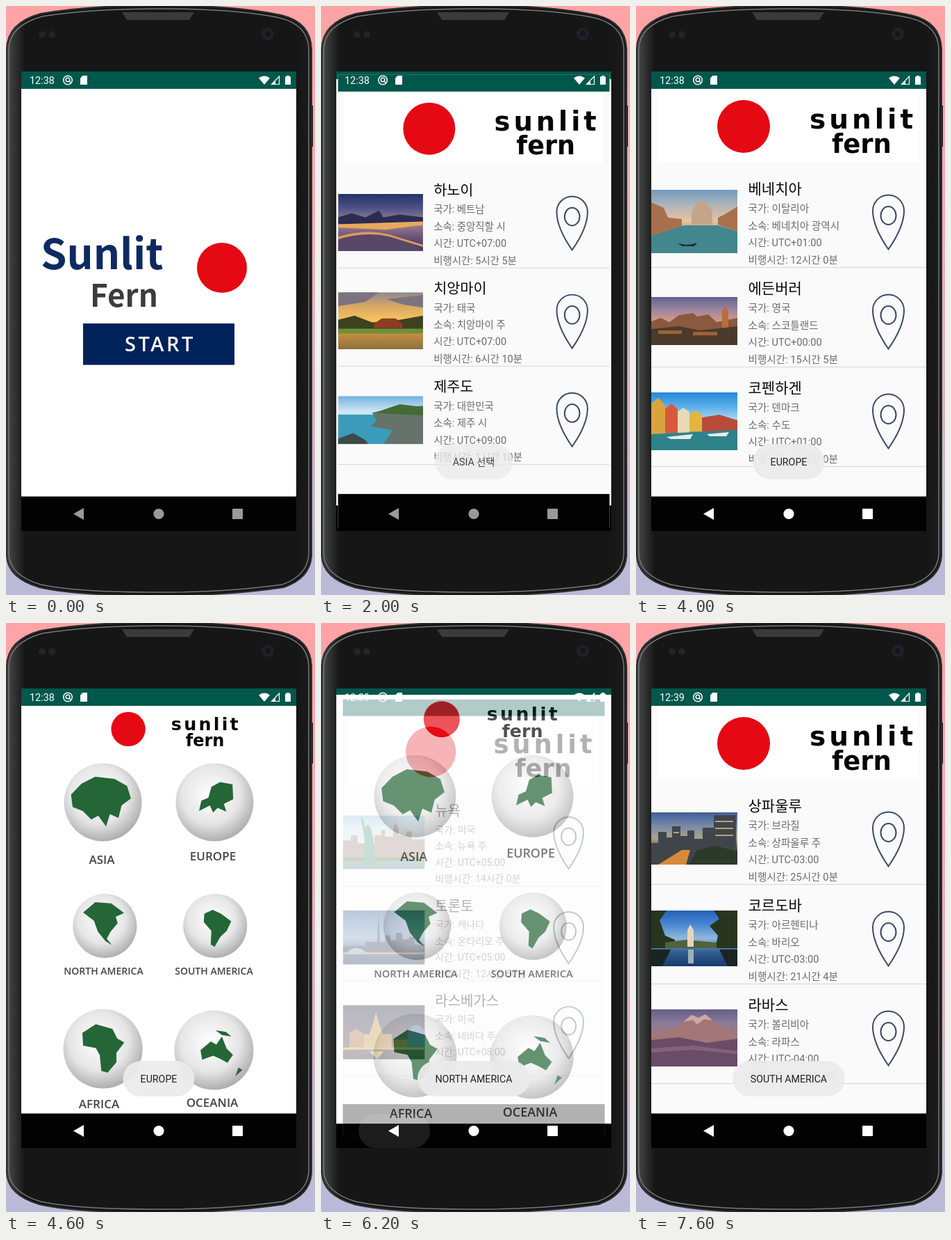
Animation of 445x846 px, one loop 8000 ms. Source, as an HTML page:

```html
<!DOCTYPE html>
<html lang="ko">
<head>
<meta charset="utf-8">
<title>City guide demo</title>
<style>
  html, body { margin: 0; width: 100%; height: 100%; overflow: hidden; }
  svg { display: block; width: 100%; height: 100%; }
  text { font-family: Roboto, "Noto Sans CJK KR", "Noto Sans CJK", sans-serif; white-space: pre; }
  .mid { text-anchor: middle; }
  .brand { font-family: "Noto Sans CJK KR", "Noto Sans CJK", "Noto Sans", sans-serif; font-weight: 700; }
  .round { font-family: "DejaVu Sans", sans-serif; font-weight: 700; }
  .hand { font-family: "Open Sans", sans-serif; font-weight: 600; }
</style>
</head>
<body>
<svg id="stage" viewBox="0 0 445 846"></svg>
<script>
const LOOP = 8000, STEP = 100;
const RED = '#e50914', TEAL = '#00574b';

const rect = (x, y, w, h, fill, extra = '') =>
  `<rect x="${x}" y="${y}" width="${w}" height="${h}" fill="${fill}" ${extra}/>`;
const circle = (x, y, r, fill, extra = '') =>
  `<circle cx="${x}" cy="${y}" r="${r}" fill="${fill}" ${extra}/>`;
const path = (d, fill, extra = '') => `<path d="${d}" fill="${fill}" ${extra}/>`;
const text = (x, y, size, fill, str, extra = '') =>
  `<text x="${x}" y="${y}" font-size="${size}" fill="${fill}" ${extra}>${str}</text>`;
const gradient = (id, colors, across = false) =>
  `<linearGradient id="${id}" x2="${across ? 1 : 0}" y2="${across ? 0 : 1}">` +
  colors.map((c, i) => `<stop offset="${i / (colors.length - 1)}" stop-color="${c}"/>`).join('') +
  '</linearGradient>';

// A full app window with its status and navigation backgrounds.
const appWindow = (id, background, content) =>
  `<g id="${id}">${rect(22, 94, 396, 660, background)}${content}
   ${rect(22, 94, 396, 25, TEAL)}${rect(22, 704.5, 396, 50, '#020202')}</g>`;

const startScreen = appWindow('start', '#fff',
  text(50, 378, 60, '#0e2a60', 'Sunlit', 'class="brand"') +
  text(121, 432, 44, '#3c3c3e', 'Fern', 'class="brand"') +
  circle(311, 376, 36, RED) +
  rect(111, 456, 218, 59.5, '#00225a') +
  text(222, 496, 29, '#fff', 'START', 'class="mid hand" letter-spacing="3.5"'));

const header = (scale, x, y) =>
  `<g transform="translate(${x} ${y}) scale(${scale})">
   ${circle(-170, -1, 38, RED)}
   ${text(2, 1.5, 39, '#050505', 'sunlit', 'class="mid round" letter-spacing="5"')}
   ${text(0, 36.5, 37, '#050505', 'fern', 'class="mid round"')}</g>`;

// Land outlines are relative to a globe of radius 100.
const globes = [
  ['ASIA', 139.6, 257.6, 56, 138, 346, 17, 'M-82-20-55-48-20-66 30-60 62-42 72-10 48 8 40 40 18 30 8 62-12 34-30 44-52 22-78 12Z'],
  ['EUROPE', 300.4, 257.6, 56, 298, 341, 17, 'M-8-40 14-52 46-46 48-8 24 4 30 24 8 14-4 26-12 8-40 22-34-4-16-12Z'],
  ['NORTH AMERICA', 142.4, 435, 46, 140.5, 505, 14, 'M-68-42-30-74 20-70 60-40 34-28 40-8 18 18 6 40 22 60 2 48-22 18-34-16Z'],
  ['SOUTH AMERICA', 301.3, 435, 46, 299.5, 505, 14, 'M-34-38-8-50 18-38 50-14 36 16 16 34-2 66-14 58-12 16-36-12Z'],
  ['AFRICA', 139.6, 611.6, 57, 134, 697, 17, 'M-52-40-18-62 24-50 36-26 54-16 34 10 34 34 12 60-4 56-8 16-18-2-50-8Z'],
  ['OCEANIA', 299.5, 613.5, 57, 297, 695, 17, 'M-34 0-8-22 6-14 20-34 32-4 48 12 34 32 16 22-2 14-30 24ZM4-50 30-46 44-34 20-38ZM62 44 72 50 54 66Z']
];
const menuScreen = appWindow('menu', '#fff', header(.65, 286.6, 153) +
  globes.map(([name, x, y, r, labelX, labelY, size, land]) =>
    circle(x, y, r, 'url(#globe)') +
    path(land, '#246636', `transform="translate(${x} ${y}) scale(${r / 100})"`) +
    text(labelX, labelY, size, '#444', name, 'class="mid hand"')).join(''));

// City: name, country, region, time zone, flight, photo top, photo height, backdrop, [colour, shape]...
const lists = {
  asia: [
    ['하노이', '베트남', '중앙직할 시', 'UTC+07:00', '5시간 5분', 268, 83, ['#243266', '#4d5288', '#a48590', '#6a5478', '#42385e'],
      ['#2b2c50', 'M0 34 20 28 40 34 60 24 66 34 90 30 124 34V44H0Z'], ['#e9a85c', 'M0 44 124 40V45L70 52 0 49Z'],
      ['#584766', 'M0 83V66Q40 54 70 60T124 83Z'], ['#d99a63', 'M0 62Q40 50 75 59L124 74V77L75 62Q40 54 0 66Z']],
    ['치앙마이', '태국', '치앙마이 주', 'UTC+07:00', '6시간 10분', 411, 83, ['#8d8890', '#d9a864', '#f6c65c', '#c08a40', '#8d7140'],
      ['#7b7480', 'M0 0H60L40 14 0 20ZM70 10 124 4V22L96 18Z'], ['#3c4220', 'M0 40 24 34 50 44 90 40 124 34V58H0Z'],
      ['#8c3c24', 'M52 46 64 38 84 38 94 46V52H52Z'], ['#6f9038', 'M0 53H124V60H0Z']],
    ['제주도', '대한민국', '제주 시', 'UTC+09:00', '1시간 10분', 562, 70, ['#6fb2e0', '#d5e8f2', '#3f9fbf', '#257e9f'],
      ['#3a9cba', 'M0 27H124V70H0Z'], ['#66736a', 'M50 24 80 18 124 14V70H66L80 50 48 44 56 36Z'],
      ['#456b35', 'M54 24 90 12 124 16V28L80 26Z'], ['#3d4a48', 'M0 70V62L22 54 40 64 44 70Z']]
  ],
  europe: [
    ['베네치아', '이탈리아', '베네치아 광역시', 'UTC+01:00', '12시간 0분', 264, 91, ['#6f9bc0', '#b3b5b8', '#e6c4a0', '#5a9197', '#306f7a'],
      ['#c5a58a', 'M58 50V32Q64 18 73 17 83 18 88 32V50Z'], ['#a8714e', 'M0 18 18 26 24 40 44 42V54L0 66ZM124 24 108 34 96 40V50L124 60Z'],
      ['#42878d', 'M0 66 48 51H96L124 60V91H0Z'], ['#1e2c32', 'M38 76Q50 82 66 76L62 81H44Z']],
    ['에든버러', '영국', '스코틀랜드', 'UTC+00:00', '15시간 5분', 418, 69, ['#5f6490', '#9a84a0', '#d29a88', '#70493c', '#3c302a'],
      ['#8b5840', 'M0 35 14 30 26 36 40 26 60 23 66 28 82 25 94 36 124 30V52H0Z'], ['#bc6c38', 'M102 44V20L106 12 111 20V44Z'],
      ['#4b3a2c', 'M0 46 40 42 70 48 124 42V69H0Z'], ['#9d6336', 'M10 48H44V53H10ZM60 50H95V55H60Z']],
    ['코펜하겐', '덴마크', '수도', 'UTC+01:00', '11시간 0분', 555, 83, ['#2587d8', '#5cb0ea', '#b6dbf0', '#478c96', '#28727e'],
      ['#d9a43c', 'M0 16 10 8 20 18V60H0Z'], ['#d65a3c', 'M20 24 29 16 38 24V58H20Z'], ['#e8d9ba', 'M38 28 46 22 55 28V58H38Z'],
      ['#e4b63e', 'M55 32 64 26 73 32V56H55Z'], ['#b84c3a', 'M73 36 98 32 124 40V56H73Z'], ['#2f828a', 'M0 60 124 54V83H0Z'],
      ['#e8ece8', 'M22 64 60 60 56 67H28ZM80 60 112 57 108 63H84Z']]
  ],
  north: [
    ['뉴욕', '미국', '뉴욕 주', 'UTC+05:00', '14시간 0분', 269, 81, ['#8fbde0', '#c8dfec', '#d9e2e4', '#80a0ac', '#56818e'],
      ['#9a8578', 'M0 38H12V30H22V42H48V30H58V22H64V32H76V18L80 10 84 18V30H96V24H104V36H124V66H0Z'], ['#5c7747', 'M0 63H124V69H0Z'],
      ['#4d967c', 'M31 81 33 38 30 18 27 4 30 3 34 18Q38 10 42 18L46 34 50 81Z']],
    ['토론토', '캐나다', '온타리오 주', 'UTC+05:00', '12시간 50분', 412, 82, ['#234d88', '#4673ae', '#7797bd', '#263f6c', '#122648'],
      ['#1d2c4c', 'M0 54H34V48H52L53 18 54 4 55 18 56 48H64V38H72V46H80V34H90V44H100V40H108V52H124V66H0Z'],
      ['#65a4de', 'M6 64Q20 50 36 64Z'], ['#d7a85a', 'M0 64H124V66H0Z']],
    ['라스베가스', '미국', '네바다 주', 'UTC+08:00', '13시간 15분', 555, 82, ['#11142d', '#20203a', '#312738', '#45342e', '#201d2c'],
      ['#c08a2c', 'M26 66V44H40Q46 30 50 10 54 30 61 44H74V66Z'], ['#a55b2c', 'M10 66V42L20 36 32 44V66ZM76 66V52H98V66Z'],
      ['#405fae', 'M98 66V40Q111 20 124 40V66Z'], ['#d9a43e', 'M0 64H124V67H0ZM40 70H62L52 82Z']]
  ],
  south: [
    ['상파울루', '브라질', '상파울루 주', 'UTC-03:00', '25시간 0분', 272, 75, ['#405f99', '#7788a8', '#ada28e', '#4b3e38', '#2b282a'],
      ['#40454c', 'M0 44H10V28H22V36H30V20H42V34H52V26H62V38H74V22H90V4H122V75H0Z'],
      ['#baa070', 'M92 12H118V14H92ZM92 22H118V24H92ZM92 32H118V34H92ZM32 28H40V30H32Z'],
      ['#d78b39', 'M10 75 44 54H56L50 75Z'], ['#2c3a2a', 'M54 75 66 54 92 48 124 56V75Z']],
    ['코르도바', '아르헨티나', '바리오', 'UTC-03:00', '21시간 4분', 413, 80, ['#2460b8', '#4a87d0', '#91b8dc', '#305c8d', '#173b70'],
      ['#27351f', 'M0 0H22L12 14 20 36 34 42V54H0ZM124 0H90L98 12 84 22 96 36 92 54H124Z'],
      ['#50633e', 'M20 46 50 42 94 46V54H20Z'], ['#e4d5b8', 'M52 52V28L56 20 61 28V52Z'],
      ['#9fafb8', 'M53 56H61V76H53Z'], ['#1a2420', 'M0 56H28L16 80H0ZM98 56H124V80H110Z']],
    ['라바스', '볼리비아', '라파스', 'UTC-04:00', '26시간 0분', 555, 82, ['#655f88', '#8c7c9a', '#a0747c', '#70506a', '#49375a'],
      ['#a47677', 'M0 34 36 26 58 8 68 12 78 7 98 24 124 32V50H0Z'], ['#c9aaa8', 'M46 18 58 8 68 12 78 7 88 16 76 14 66 22 60 15Z'],
      ['#694c68', 'M0 44 40 40 80 48 124 42V82H0Z'], ['#85617a', 'M0 56 60 52 124 60V64L60 58 0 62Z']]
  ]
};

const photo = (id, y, h, colors, shapes) =>
  `<defs>${gradient(id, colors)}</defs>
   <svg x="22" y="${y}" width="124" height="${h}">
   ${rect(0, 0, 124, h, `url(#${id})`)}${shapes.map(([color, d]) => path(d, color)).join('')}</svg>`;

const pin = path('M363.5 349.5C352 333 341 313 341 294A22.5 22.5 0 0 1 386 294C386 313 375 333 363.5 349.5Z', 'none') +
  '<ellipse cx="363.5" cy="301" rx="11" ry="13" fill="none"/>';

const cityRow = (list, index, [name, country, region, zone, flight, y, h, colors, ...shapes]) => {
  const lines = [`국가: ${country}`, `소속: ${region}`, `시간: ${zone}`, `비행시간: ${flight}`];
  return photo(`${list}-photo-${index}`, y, h, colors, shapes) +
    `<g transform="translate(0 ${index * 143})">
     ${text(161.5, 270, 21, '#080808', name)}
     ${lines.map((line, i) => text(161.5, 295.8 + i * 24.7, 14.6, '#6c6c6c', line)).join('')}
     <g stroke="#3b4a66" stroke-width="2">${pin}</g>
     ${rect(22, 375, 396, 1, '#d6d6da')}</g>`;
};
const listScreen = ([id, cities]) => appWindow(id, '#fafafa',
  rect(31, 119, 377, 105, '#fff') + header(1, 325, 174) +
  cities.map((city, i) => cityRow(id, i, city)).join(''));

// Toast: label, width, fade-in start, fade-out start
const toasts = [
  ['ASIA 선택', 112, 1750, 3500],
  ['EUROPE', 103, 3700, 5350],
  ['NORTH AMERICA', 162, 5300, 7150],
  ['SOUTH AMERICA', 162, 7300, LOOP]
];
const toastMarkup = ([label, width], i) =>
  `<g id="toast${i}">${rect(220 - width / 2, 629, width, 51, '#ebebeb', 'rx="25.5" opacity=".94"')}
   ${text(220, 660, 14.2, '#222', label, 'class="mid"')}</g>`;

const body = 'M1 62Q2 24 50 11 120-1 220-1 330-1 396 13 439 23 440 62V790Q438 822 400 835 320 847 220 847 100 847 48 835 3 822 1 790Z';
const rim = 'M4 62Q5 28 52 15 120 4 220 4 330 4 394 17 435 27 436 62V788Q434 818 398 831 320 842 220 842 100 842 50 831 6 818 4 788Z';
const phone = rect(0, 0, 445, 846, 'url(#wall)') +
  rect(438, 143, 4, 59, '#191919') +
  path(body, 'url(#shell)', 'stroke="#2c2e2e" stroke-width="2"') +
  path(rim, 'none', 'stroke="#767878" stroke-width="1.5"') +
  path('M167 9H271L264 20H174Z', '#393b3b') +
  circle(377, 40, 9, '#202127') + circle(377, 40, 4, '#15161c') +
  circle(52, 41, 5, '#242424') + circle(66, 41, 5, '#242424');

const statusIcons = text(34, 112, 14.4, '#fff', '', 'id="clock"') +
  circle(89, 106.5, 6.3, 'none', 'stroke="#fff" stroke-width="1.5"') +
  circle(89, 106, 2.8, 'none', 'stroke="#fff" stroke-width="1.5"') +
  path('M91 108 94 111', 'none', 'stroke="#fff" stroke-width="1.5"') +
  path('M110.500 100H117V113H107V103.500Z', '#fff') +
  path('M364 103.500Q372 97.500 380 103.500L372 113Z', '#fff') +
  path('M393.500 101V112.500H382.500Z', 'none', 'stroke="#fff" stroke-width="1.2"') +
  path('M388 107V112.500H382.500Z', '#fff') +
  path('M402 101.500H404V100H408V101.500H410V113H402Z', '#fff');

const navigation = rect(54, 705, 103, 49, '#fff', 'id="ripple" rx="24.5"') +
  `<g id="nav">${path('M97 729.500 112 721V738Z', 'inherit')}${circle(220, 729.5, 7.6, 'inherit')}${rect(326, 722, 15, 15, 'inherit', 'rx="1"')}</g>`;

document.getElementById('stage').innerHTML =
  `<defs>
   ${gradient('wall', ['#ffa3a5', '#f5abb2', '#d8b3c4', '#b9bad9'])}
   <linearGradient id="shell">
     <stop stop-color="#484a4a"/><stop offset=".045" stop-color="#222"/><stop offset=".06" stop-color="#161616"/>
     <stop offset=".95" stop-color="#161616"/><stop offset="1" stop-color="#1c1c1c"/>
   </linearGradient>
   <radialGradient id="globe" cx=".45" cy=".4" r=".62">
     <stop stop-color="#fff"/><stop offset=".6" stop-color="#e6e6e6"/><stop offset="1" stop-color="#aaa"/>
   </radialGradient>
   <clipPath id="display">${rect(22, 94, 396, 660, '#000')}</clipPath></defs>
   ${phone}
   <g clip-path="url(#display)">${startScreen}${menuScreen}${Object.entries(lists).map(listScreen).join('')}
   ${toasts.map(toastMarkup).join('')}${navigation}${statusIcons}</g>`;

const el = id => document.getElementById(id);
const clamp = v => Math.max(0, Math.min(1, v));
const screens = ['start', 'menu', ...Object.keys(lists)];

// Window changes: start time, from, to
const changes = [
  [-1000, 'menu', 'start'],
  [915, 'start', 'menu'],
  [1838, 'menu', 'asia'], [2747, 'asia', 'menu'],
  [3330, 'menu', 'europe'], [4212, 'europe', 'menu'],
  [5030, 'menu', 'north'], [6130, 'north', 'menu'],
  [6793, 'menu', 'south']
];
const backPresses = [2600, 4200, 6100];

const bezier = (a, b, c, d, u) => {
  const v = 1 - u;
  return a * v * v * v + 3 * b * v * v * u + 3 * c * v * u * u + d * u * u * u;
};
// Quick start, very slow finish: two joined cubic curves.
function ease(x) {
  if (x >= 1) return 1;
  const [xs, ys] = x < 1 / 6
    ? [[0, .05, .1333, 1 / 6], [0, 0, .06, .4]]
    : [[1 / 6, .2083, .25, 1], [.4, .82, 1, 1]];
  let low = 0, high = 1;
  for (let i = 0; i < 24; i++) {
    const u = (low + high) / 2;
    if (bezier(...xs, u) < x) low = u; else high = u;
  }
  return bezier(...ys, low);
}

function place(id, scale, opacity) {
  const node = el(id);
  node.style.display = 'inline';
  node.setAttribute('transform', `translate(220 424) scale(${scale}) translate(-220 -424)`);
  node.setAttribute('opacity', opacity);
}

function draw(t) {
  const [begin, from, to] = changes.findLast(change => change[0] <= t);
  const elapsed = t - begin, p = ease(elapsed / 400), fade = clamp((elapsed - 35) / 50);
  screens.forEach(id => el(id).style.display = 'none');
  if (screens.indexOf(to) > screens.indexOf(from)) {
    if (p < 1) place(from, 1 + .05 * p, 1);
    place(to, .85 + .15 * p, fade);
  } else {
    place(to, 1.1 - .1 * p, 1);
    if (fade < 1) place(from, 1 - .1 * p, 1 - fade);
  }

  toasts.forEach(([, , show, hide], i) =>
    el('toast' + i).setAttribute('opacity', clamp((t - show) / 300) * (1 - clamp((t - hide) / 300))));

  const press = backPresses.findLast(time => time <= t);
  const age = t - press;
  const ripple = press ? clamp((age + 100) / 200) * clamp((400 - age) / 150) : 0;
  el('ripple').setAttribute('opacity', .1 * ripple);
  el('nav').setAttribute('fill', press ? '#fff' : '#999');
  el('clock').textContent = t < 5100 ? '12:38' : '12:39';
}

function tick() {
  draw(Math.floor(performance.now() % LOOP / STEP) * STEP);
  requestAnimationFrame(tick);
}
tick();
</script>
</body>
</html>
```
